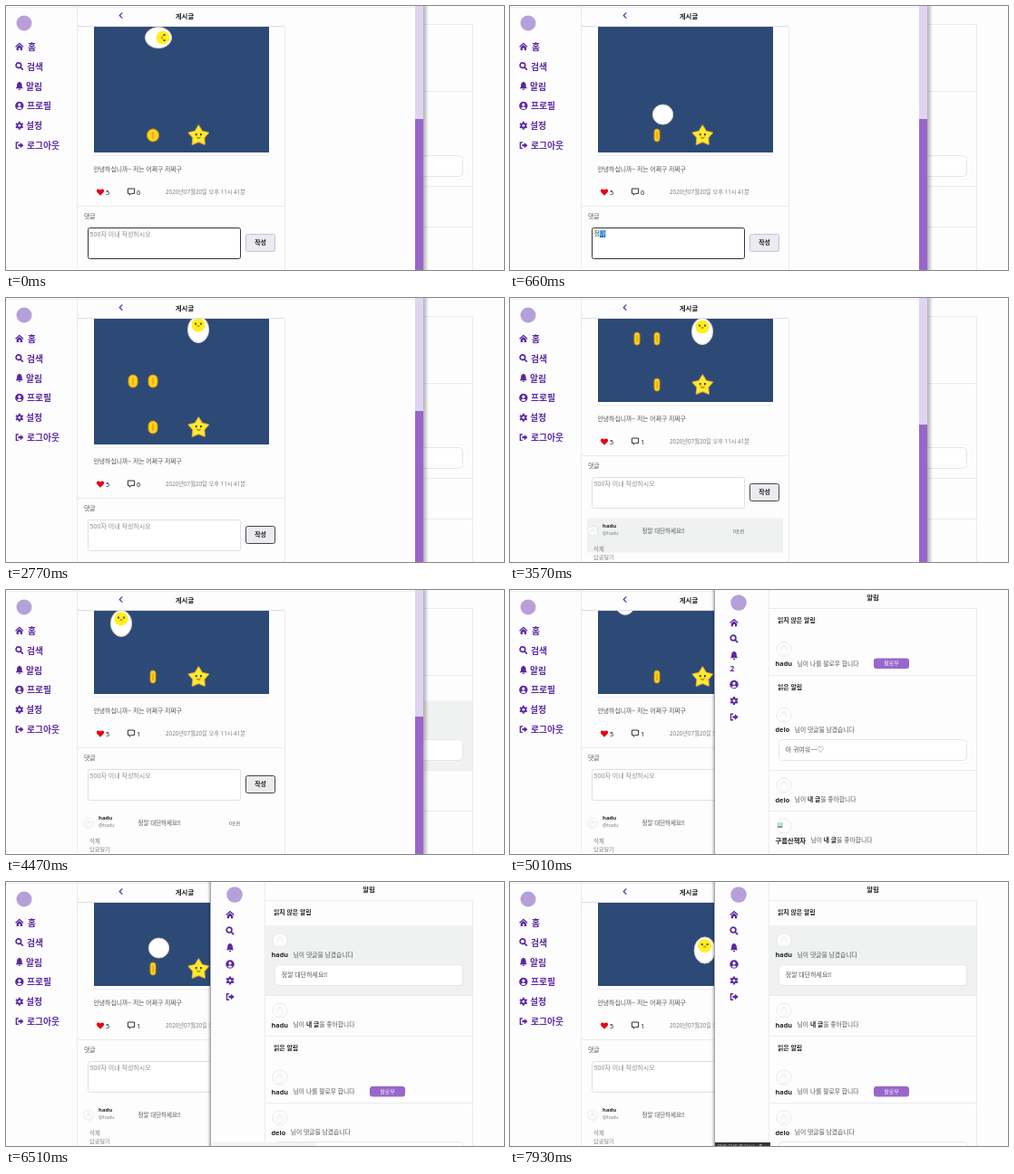
Write an HTML page with a canvas that moves like this. It is 549 px wide and 292 px high and loops after 8000 ms.

```html
<!DOCTYPE html>
<html lang="ko">
<head>
<meta charset="utf-8">
<title>알림</title>
<style>
html, body { margin: 0; width: 100%; height: 100%; overflow: hidden; background: #fefefe; }
canvas { display: block; }
</style>
</head>
<body>
<canvas id="stage" width="549" height="292"></canvas>
<script>
const ctx = document.getElementById('stage').getContext('2d');
const LOOP = 8000, GAME_PERIOD = 5860, GAME_START = 2390;
const PAGE = '#fdfdfe', LINE = '#ebeaee', PURPLE = '#5b2a9f', INK = '#222', BODY = '#555', GREY = '#808080';
const HOVER = '#f0f2f1', ACCENT = '#9966cc';
const FONT = '"Noto Sans", "Noto Sans CJK KR", "Noto Sans CJK", sans-serif';
const USER = 'hadu', FRIEND = 'delo', FAN = '구름산책자';
const COMMENT = '정말 대단하세요!!';

const T = { submit: 2710, cleared: 2770, posted: 2950, scroll: 3390, hoverOff: 4230,
  behindHover: 4350, swap: 4800, refresh: 6210, itemHover: 6390, status: 6450, darkStatus: 7010, shortStatus: 7870 };

// Text in the comment field as syllables are composed.
const TYPING = [[180, 'ㅈ'], [300, '저'], [420, '정'], [540, '정ㅁ'], [660, '정마'], [780, '정말'], [840, '정말 '],
  [900, '정말 ㄷ'], [1020, '정말 대'], [1140, '정말 댇'], [1200, '정말 대다'], [1260, '정말 대단'],
  [1350, '정말 대단ㅎ'], [1410, '정말 대단하'], [1490, '정말 대단핫'], [1550, '정말 대단하세'],
  [1940, '정말 대단하세요'], [2000, '정말 대단하세요!'], [2390, COMMENT]];

// Egg route: time, x, y, pose held until the next point.
const ROUTE = [[2390, 212, 35, 'up'], [3390, 212, 35, 'up'], [3560, 212, 84, 'up'], [3600, 212, 84, 'left'],
  [4440, 127, 84, 'up'], [4760, 127, 84, 'up'], [5270, 127, 35, 'right'], [5700, 168, 35, 'right'],
  [5910, 168, 35, 'back'], [6500, 168.5, 120, 'back'], [6750, 168.5, 121, 'up'], [7010, 168.5, 123, 'right'],
  [7510, 215, 123, 'right'], [7610, 214.7, 122.5, 'up'], [9000, 214.7, 122.5, 'up']];
// Coins: x, y, time collected.
const COINS = [[162, 92, 4040], [140, 92, 4250], [162, 143, 7010]];
const STAR_TAKEN = 7350;

const ICONS = {
  home: { fill: 'M0 5 5 .5 10 5 9.2 6 5 2.3 .8 6ZM1.6 6.2 5 3.2 8.4 6.2V9.5H6V7H4V9.5H1.6Z' },
  search: { stroke: 'M7 4A3 3 0 1 1 1 4A3 3 0 1 1 7 4ZM6.2 6.2 9.3 9.3', width: 1.8 },
  bell: { fill: 'M5 0C2.5 .8 2 2.5 2 4.5 2 6.5 1 7 .8 8H9.2C9 7 8 6.5 8 4.5 8 2.5 7.5 .8 5 0ZM3.7 8.6H6.3A1.3 1.3 0 0 1 3.7 8.6Z' },
  user: { fill: 'M5 0A5 5 0 1 1 5 10A5 5 0 1 1 5 0Z',
    hole: 'M5 2A1.7 1.7 0 1 1 5 5.4A1.7 1.7 0 1 1 5 2ZM2 7.8Q5 4.6 8 7.8Q5 10 2 7.8Z' },
  cog: { stroke: 'M7.6 5A2.6 2.6 0 1 1 2.4 5A2.6 2.6 0 1 1 7.6 5ZM5 .2V2M5 8V9.8M.8 2.6 2.4 3.5M7.6 6.5 9.2 7.4M.8 7.4 2.4 6.5M7.6 3.5 9.2 2.6', width: 2.1 },
  exit: { fill: 'M3.5 3.8H6V1.6L10 5 6 8.4V6.2H3.5Z', stroke: 'M4 1.6H1.3V8.4H4', width: 1.5 },
  heart: { fill: 'M5 9.5 .8 5C-1.2 2 2.5-.8 5 2.2 7.5-.8 11.2 2 9.2 5Z' },
  talk: { stroke: 'M.8 1H9.2V7.2H5.2L3 9.2V7.2H.8Z', width: 1.1 },
  back: { stroke: 'M6.5 1.5 3 5 6.5 8.5', width: 1.3 }
};

function icon(name, x, y, color = PURPLE, size = 9.5) {
  const shape = ICONS[name];
  ctx.save();
  ctx.translate(x - size / 2, y - size / 2);
  ctx.scale(size / 10, size / 10);
  ctx.fillStyle = ctx.strokeStyle = color;
  if (shape.fill) ctx.fill(new Path2D(shape.fill));
  if (shape.stroke) { ctx.lineWidth = shape.width; ctx.stroke(new Path2D(shape.stroke)); }
  if (shape.hole) { ctx.fillStyle = PAGE; ctx.fill(new Path2D(shape.hole)); }
  ctx.restore();
}

// Draws text centred vertically on y and returns its right edge.
function text(str, x, y, size, color = INK, weight = 400, align = 'left') {
  ctx.font = `${weight} ${size}px ${FONT}`;
  ctx.textAlign = align;
  ctx.fillStyle = color;
  ctx.fillText(str, x, y + size * 0.36);
  return x + ctx.measureText(str).width;
}

function rect(x, y, w, h, color) {
  ctx.fillStyle = color;
  ctx.fillRect(x, y, w, h);
}

function box(x, y, w, h, r, fill, stroke) {
  ctx.beginPath();
  ctx.roundRect(x + 0.5, y + 0.5, w, h, r);
  ctx.fillStyle = fill;
  ctx.fill();
  if (!stroke) return;
  ctx.strokeStyle = stroke;
  ctx.lineWidth = 1;
  ctx.stroke();
}

function oval(x, y, rx, ry, fill, stroke, width = 1) {
  ctx.beginPath();
  ctx.ellipse(x, y, rx, ry, 0, 0, Math.PI * 2);
  if (fill) { ctx.fillStyle = fill; ctx.fill(); }
  if (stroke) { ctx.strokeStyle = stroke; ctx.lineWidth = width; ctx.stroke(); }
}

// Fades out from x; a negative reach casts to the left.
function shadow(x, reach) {
  const g = ctx.createLinearGradient(x, 0, x + reach, 0);
  g.addColorStop(0, 'rgba(0,0,0,.3)');
  g.addColorStop(1, 'rgba(0,0,0,0)');
  rect(x, 0, reach, 292, g);
}

function avatar(x, y, r) {
  oval(x, y, r, r, '#fff', '#e2e2e2', 0.8);
  oval(x, y + r * 0.15, r * 0.45, r * 0.62, null, '#e6e6e6', 0.7);
  oval(x, y - r * 0.2, r * 0.25, r * 0.2, null, '#e4e4e4', 0.6);
}

function drawEgg(g) {
  const i = ROUTE.findIndex((p, n) => g < ROUTE[n + 1][0]);
  const [t0, x0, y0, pose] = ROUTE[i], [t1, x1, y1] = ROUTE[i + 1];
  const k = (g - t0) / (t1 - t0);
  ctx.save();
  ctx.translate(x0 + (x1 - x0) * k, y0 + (y1 - y0) * k);
  if (pose === 'back') {
    oval(0, 0, 11.2, 11, '#fff', '#d3cec6');
  } else {
    if (pose !== 'up') ctx.rotate(pose === 'right' ? Math.PI / 2 : -Math.PI / 2);
    oval(0, 0, 11.6, 14.6, '#fff', '#d3cec6');
    oval(0, -5, 7.6, 7.4, '#fff01e');
    rect(-4, -7.5, 2, 2, '#5a4a10');
    rect(2, -7.5, 2, 2, '#5a4a10');
    rect(-1.5, -5, 3, 2, '#e8941a');
  }
  ctx.restore();
}

function drawStar(x, y) {
  ctx.beginPath();
  for (let i = 0; i < 10; i++) {
    const r = i % 2 ? 6.3 : 11.3, a = i * Math.PI / 5 - Math.PI / 2;
    ctx.lineTo(x + r * Math.cos(a), y + 0.7 + r * Math.sin(a));
  }
  ctx.closePath();
  ctx.lineJoin = 'round';
  ctx.strokeStyle = '#d9a441';
  ctx.lineWidth = 2;
  ctx.stroke();
  ctx.fillStyle = '#ffea2e';
  ctx.fill();
  ctx.lineJoin = 'miter';
  rect(x - 3.5, y - 2, 1.8, 2.2, '#4a3a10');
  rect(x + 1.7, y - 2, 1.8, 2.2, '#4a3a10');
  ctx.beginPath();
  ctx.arc(x, y + 1.3, 2, 0.2, Math.PI - 0.2);
  ctx.strokeStyle = '#8a5a10';
  ctx.lineWidth = 1;
  ctx.stroke();
}

function drawGame(t) {
  const g = t < GAME_START ? t + GAME_PERIOD : t;
  ctx.save();
  ctx.beginPath();
  ctx.rect(97, 0, 193, 162);
  ctx.clip();
  rect(97, 0, 193, 162, '#2d4a77');
  const spin = (Math.min(Math.max(g, 3390), 6690) - 3570) / 500;
  const width = Math.min(13, Math.max(6, 10 - 8 * Math.cos(2 * Math.PI * (spin - 0.89))));
  for (const [x, y, taken] of COINS) {
    if (g >= taken) continue;
    box(x - width / 2 - 0.5, y - 7.5, width, 14, width / 2, '#fdd21c', '#cf9414');
    rect(x - 0.7, y - 4, 1.4, 8, '#e0a414');
  }
  if (g < STAR_TAKEN) drawStar(212.3, 143);
  drawEgg(g);
  ctx.restore();
}

function drawField(t) {
  const focused = t < T.submit;
  box(90, 245, 168, 34, 2, '#fff', focused ? '#333' : '#e0dfe3');
  const typed = t < T.cleared ? TYPING.filter(([at]) => t >= at).pop() : null;
  if (!typed) {
    text('500자 이내 작성하시오', 92.5, 252, 7, '#8c8c8c');
  } else {
    const str = typed[1], last = str.slice(-1);
    const composing = /[ㄱ-힣]/.test(last);
    const x = text(composing ? str.slice(0, -1) : str, 92.5, 252, 6.9, '#444');
    if (composing) {
      rect(x, 248, 6.4, 8, '#0a78d7');
      text(last, x, 252, 6.9, '#fff');
    }
  }
  box(264, 252, 32, 19, 2, '#ecebef', focused ? '#cdbbe6' : '#444');
  text('작성', 280.5, 262, 6.9, INK, 700, 'center');
}

function drawComment(hovered) {
  if (hovered) rect(85, 290.5, 216, 38, HOVER);
  avatar(91, 305, 5.5);
  text(USER, 102, 299, 6, INK, 700);
  text('@' + USER, 102, 307, 5.3, GREY);
  text(COMMENT, 145.5, 305, 6.5, BODY);
  text('0초전', 246, 305, 5, BODY);
  text('삭제', 92, 324.5, 6.4, GREY);
  text('답글달기', 92, 334, 6.2, GREY);
}

function drawPost(t) {
  rect(0, 0, 460, 292, PAGE);
  const progress = Math.min(1, Math.max(0, (t - T.scroll) / 150));
  const posted = t >= T.posted;

  ctx.save();
  ctx.translate(0, -47 * progress);
  drawGame(t);
  rect(96, 165, 193, 1, '#eeedf0');
  text('안녕하십니까~ 저는 어쩌구 저쩌구', 96.5, 181, 6.85, BODY);
  icon('heart', 104, 206, '#e60012', 8.6);
  text('5', 110, 206, 7.3, INK, 500);
  icon('talk', 138, 205.5, INK, 8.6);
  text(posted ? '1' : '0', 144, 206, 7.3, INK, 500);
  text('2020년07월20일 오후 11시 41분', 176, 206, 6.25, GREY);
  rect(79, 221, 228, 1, LINE);
  text('댓글', 86, 233, 6.9, BODY);
  drawField(t);
  if (posted) drawComment(t < T.hoverOff);
  ctx.restore();

  rect(79, 0, 228, 23, PAGE);
  rect(0, 1, 451, 1, '#f0eef4');
  rect(79, 22, 228, 1, '#dfdde3');
  rect(78, 0, 1, 292, LINE);
  rect(307, 23, 1, 269, LINE);
  icon('back', 127, 10.5, PURPLE, 9);
  text('게시글', 197, 11, 7.4, INK, 700, 'center');

  oval(20, 19, 8.5, 8.5, '#b5a0da');
  [['home', '홈', 24], ['search', '검색', 23], ['bell', '알림', 22], ['user', '프로필', 23],
   ['cog', '설정', 22], ['exit', '로그아웃', 23]].forEach(([name, label, x], i) => {
    icon(name, 14.8, 44.7 + 21.9 * i, PURPLE, 9.3);
    text(label, x, 45.2 + 21.9 * i, 9.75, PURPLE, 700);
  });

  const thumb = posted ? 113 + 27 * progress : 125;
  rect(451, 0, 9, 292, '#e0d4f2');
  rect(451, thumb, 9, 292, ACCENT);
}

// One notification; y is the centre line of its sentence.
function notice(name, kind, y, body) {
  if (name === FAN) {
    oval(302, y - 16, 8, 8, '#fff', '#e6e6e6', 0.8);
    rect(295, y - 20, 6, 6, '#c9d8e8');
    rect(295, y - 16, 5, 2, '#6fae62');
  } else {
    avatar(302, y - 16, 8);
  }
  const x = text(name, 292.5, y, 7.3, INK, 700) + 5.5;
  if (kind === 'like') {
    const bold = text('님이 ', x, y, 6.8, BODY);
    text('을 좋아합니다', text('내 글', bold, y, 6.8, INK, 700), y, 6.8, BODY);
  } else {
    text(kind === 'follow' ? '님이 나를 팔로우 합니다' : '님이 댓글을 남겼습니다', x, y, 6.8, BODY);
  }
  if (kind === 'follow') {
    box(400.5, y - 6.5, 39, 11.5, 3, ACCENT);
    text('팔로우', 420.5, y - 0.5, 6, '#fff', 400, 'center');
  }
  if (kind === 'comment') {
    box(296, Math.round(y + 10), 207, 23, 4, '#fff', '#e6e5e9');
    text(body, 303.8, y + 21.5, 6.95, BODY);
  }
}

function divider(y) { rect(286, y, 228, 1, LINE); }

function drawNotifications(t) {
  const fresh = t >= T.refresh;
  rect(226, 0, 323, 292, PAGE);
  rect(285, 0, 1, 292, LINE);
  rect(514, 20, 1, 272, LINE);
  divider(20);
  text('알림', 400, 8, 7.4, INK, 700, 'center');
  text('읽지 않은 알림', 295, 34, 6.9, INK, 700);

  if (fresh) {
    if (t >= T.itemHover) rect(286, 48, 228, 77, HOVER);
    notice(USER, 'comment', 80.5, COMMENT);
    divider(125);
    notice(USER, 'like', 158);
    divider(170);
    text('읽은 알림', 295, 184, 6.9, INK, 700);
    notice(USER, 'follow', 232);
    divider(244);
    notice(FRIEND, 'comment', 277, '아 귀여워~~♡');
  } else {
    if (t >= T.behindHover && t < T.swap) rect(286, 122, 228, 78, HOVER);
    notice(USER, 'follow', 81.5);
    divider(94);
    text('읽은 알림', 295, 108, 6.9, INK, 700);
    notice(FRIEND, 'comment', 154.5, '아 귀여워~~♡');
    divider(199);
    notice(FRIEND, 'like', 232);
    divider(244);
    notice(FAN, 'like', 277);
  }

  oval(252, 14, 8.8, 8.8, '#b5a0da');
  const gap = fresh ? 0 : 13.5;
  icon('home', 247, 36);
  icon('search', 247, 54);
  icon('bell', 247, 72.5);
  if (!fresh) text('2', 242.5, 87, 8.5, PURPLE, 600);
  icon('user', 247, 91 + gap);
  icon('cog', 247, 109 + gap);
  icon('exit', 247, 127 + gap);

  if (t >= T.darkStatus) {
    rect(226, 288, t < T.shortStatus ? 67 : 61, 4, '#36363b');
    text('알림 목록 불러오는 중', 229, 293, 5.5, '#bbb');
  } else if (t >= T.status) {
    rect(226, 288, 116, 4, '#f2f2f4');
  }
}

function draw(now) {
  const t = now % LOOP;
  if (t < T.swap) {
    drawNotifications(t);
    shadow(460, 6);
    drawPost(t);
  } else {
    drawPost(t);
    shadow(226, -4);
    drawNotifications(t);
    rect(225, 0, 1, 292, '#a6a6aa');
  }
  requestAnimationFrame(() => draw(performance.now()));
}
draw(0);
</script>
</body>
</html>
```
